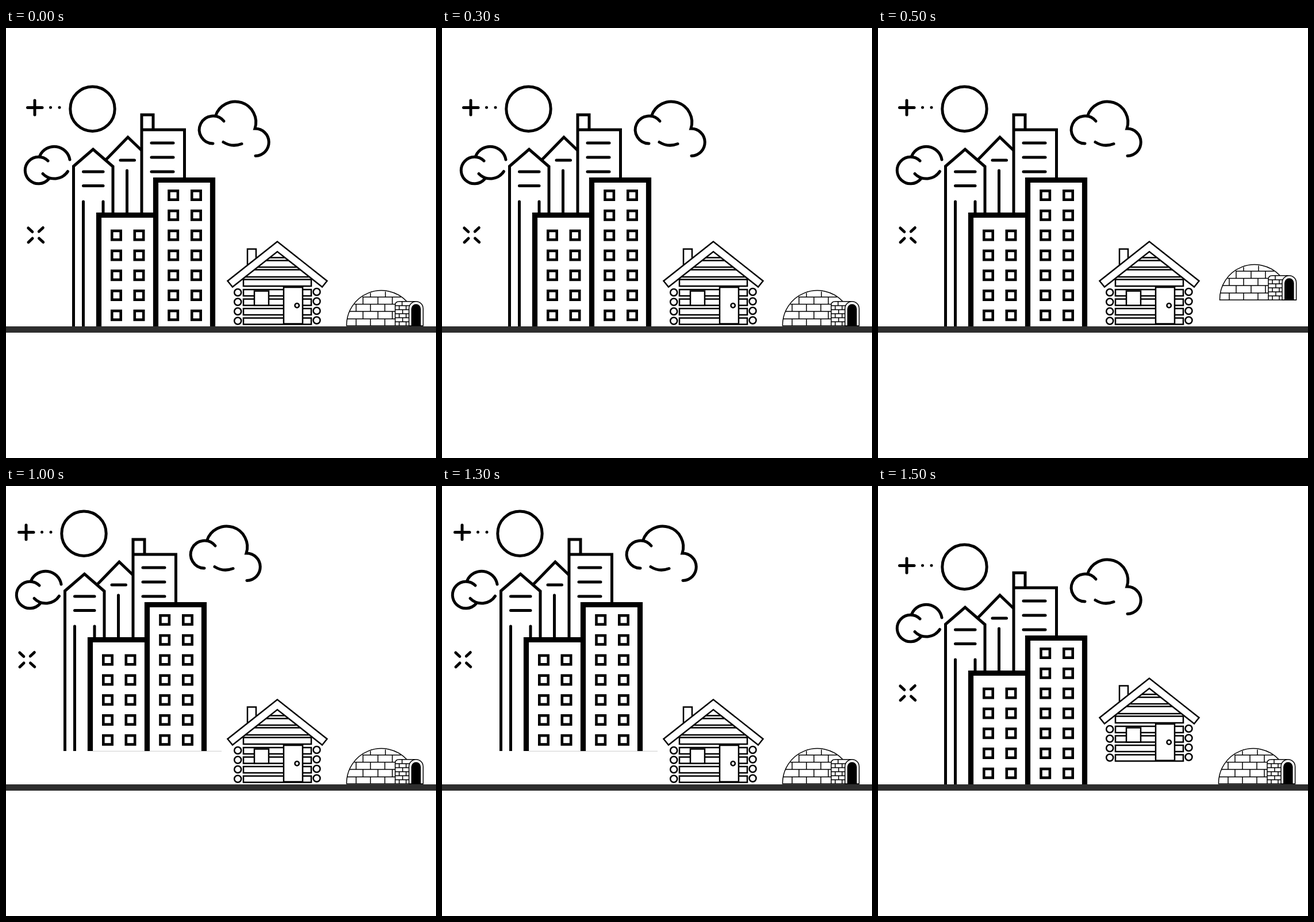
Write an HTML page that moves like this. It is 748 by 748 pixels and loops after 2 s.

```html
<!DOCTYPE html>
<html lang="en">
<head>
<meta charset="utf-8">
<title>Hopping homes</title>
<style>
  html, body { margin: 0; width: 100%; height: 100%; overflow: hidden; background: #fff; }
  svg { display: block; width: 100vw; height: 100vh; }
  g { stroke: #000; fill: none; }
  .round { stroke-linecap: round; }
  .solid { fill: #000; stroke: none; }
</style>
</head>
<body>
<svg viewBox="0 0 748 748">
  <g id="city" stroke-width="5">
    <path stroke="#ccc" stroke-width="1" d="M166 519.3H390"/>
    <g class="round">
      <path d="M37.5 138.5H63M50 126V151M77.5 138.3h.01M93 138.3h.01"/>
      <circle cx="150.5" cy="140.7" r="38.7"/>
      <path d="M38.8 348 45.8 354.5M64.3 347.5 57.3 354M39 372.7 46 366M64.7 372.5 57.5 366"/>
      <path d="M73 231A23.3 23.3 0 1 0 74 263M59 222A27.5 27.5 0 0 1 111 229M64 253.5A28 28 0 0 0 107.500 249.500"/>
      <path d="M379 162A24 24 0 1 0 360 201M364.500 153A35.500 35.500 0 1 1 433 175A23.700 23.700 0 1 1 434 222.500M378 198.500A36 36 0 0 0 410 201.500"/>
      <path d="M253 200H291M253 225H291M253 250H291M199 230H223.500M134.500 250H169M134.500 274.500H169"/>
      <path d="M210.500 248V322M169 302V322M134.500 302V330"/>
    </g>
    <path d="M134.500 320V519M117.500 519V240.500L151.500 211 186 241V322M174 229 212 190 236 213"/>
    <path d="M236 322V177H310.500V262M236 177V151H256V177"/>
    <path stroke-width="9.200" d="M161.500 519V325.500H260.500M260.500 519V264.500H359.500V519"/>
    <g id="windows" stroke-width="4.600"></g>
  </g>

  <g id="cabin" stroke-width="2.500">
    <path d="M420 412V384.500H435V400M472 371.500 385.500 440 394 450.500 472 389 550 450.500 558.500 440Z"/>
    <path d="M459 399.500H485M453 404.500H491M438 416H506M432 420.500H512M416 433H528"/>
    <rect x="413" y="437.500" width="118" height="11.500"/>
    <g id="logs"></g>
    <rect x="432" y="457.500" width="25" height="25" fill="#fff"/>
    <rect x="483" y="451" width="33" height="63.500" fill="#fff"/>
    <circle cx="506.200" cy="482.800" r="3.700"/>
  </g>

  <g id="igloo" stroke-width="1.500">
    <path d="M677 518H592.500A60.500 60 0 0 1 697 475.500"/>
    <path d="M620 468H687M606 480.500H677M598 493H677M594 506H677"/>
    <path d="M634 461V468M660 458.500V468M647 468V480.500M672 468V480.500M621 468V480.500M609 480.500V493M634 480.500V493M659 480.500V493M621 493V506M647 493V506M672 493V506M609 506V518M634 506V518M659 506V518"/>
    <path d="M677 518V482Q677 475.700 684 475.700H713.500M677 518H725.500"/>
    <path d="M677 483H702M677 490H701M677 497H701M677 504H701M677 511H701"/>
    <path d="M689 476V483M684 483V490M696 483V490M690 490V497M684 497V504M696 497V504M690 504V511M684 511V518M696 511V518"/>
    <path fill="#fff" d="M701 518V488A12.300 12.300 0 0 1 725.600 488V518Z"/>
    <path class="solid" d="M705 518V488.500A8.300 8.300 0 0 1 721.600 488.500V518Z"/>
  </g>

  <rect y="519" width="748" height="11" fill="#2e2e2e"/>
</svg>
<script>
  const byId = id => document.getElementById(id);

  // Window columns: centre x and the row they start from
  let panes = "";
  for (const [x, first] of [[192, 2], [231.5, 2], [291.2, 0], [331, 0]])
    for (let row = first; row < 7; row++)
      panes += `<rect x="${x - 7.7}" y="${283.3 + row * 34.8}" width="15.400" height="15.400"/>`;
  byId("windows").innerHTML = panes;

  let logs = "";
  for (let row = 0; row < 4; row++) {
    const y = 455 + row * 16.5;
    logs += `<rect x="413" y="${y}" width="118" height="11"/>` +
      `<circle cx="403.200" cy="${y + 5}" r="6"/><circle cx="540.500" cy="${y + 4}" r="6"/>`;
  }
  byId("logs").innerHTML = logs;

  // Each building jumps for one beat; the first beat is rest
  const BEAT = 500;
  const jumps = [null, ["igloo", 2, -45], ["city", -15, -58], ["cabin", 0, -37]];

  function draw() {
    const beat = Math.floor(performance.now() / BEAT) % jumps.length;
    jumps.forEach((jump, i) => {
      if (!jump) return;
      const [id, dx, dy] = jump;
      byId(id).setAttribute("transform", i === beat ? `translate(${dx} ${dy})` : "");
    });
    requestAnimationFrame(draw);
  }
  draw();
</script>
</body>
</html>
```
